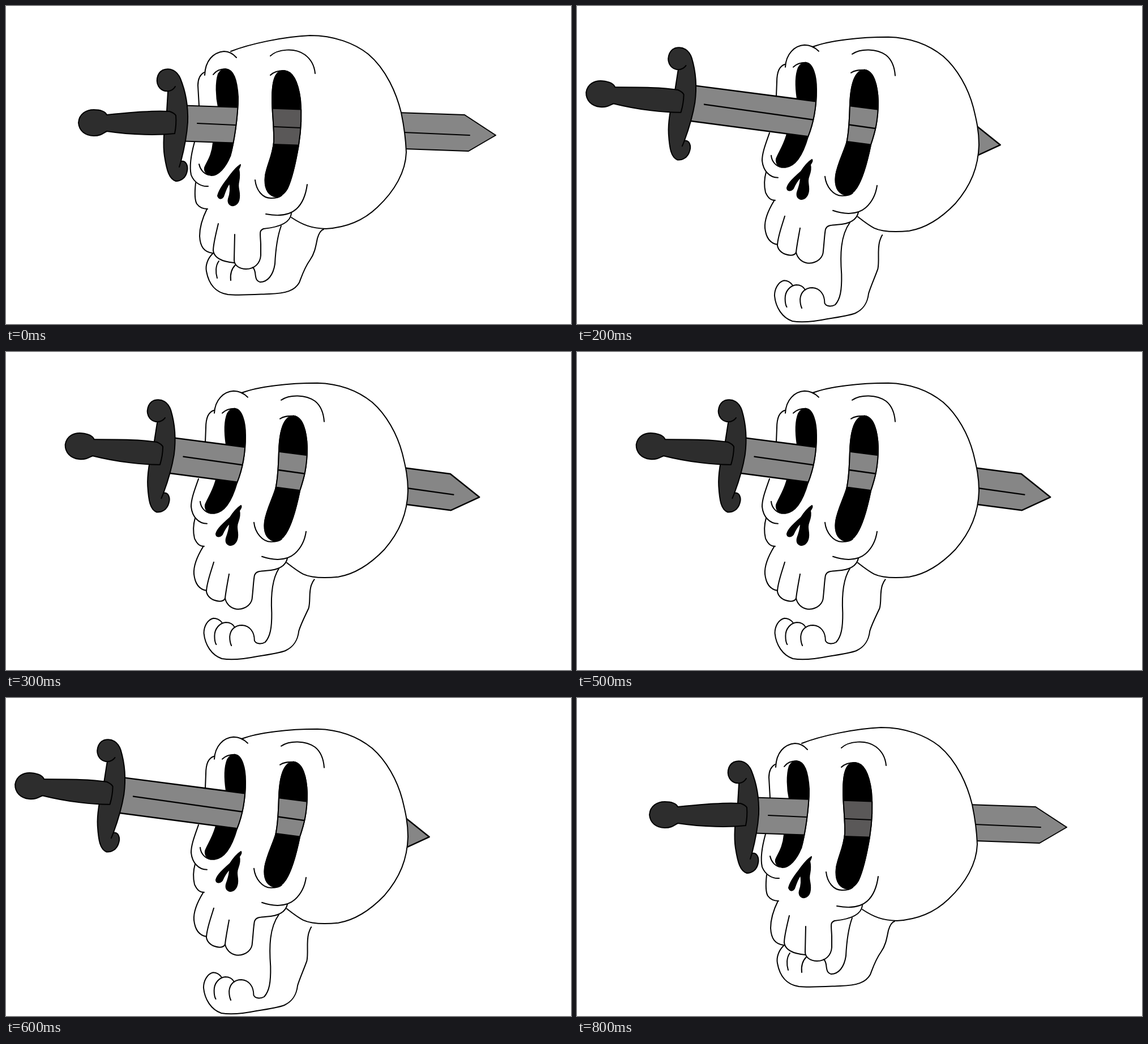
Animation, 998 px wide and 561 px high, one loop 900 ms. Source, as an HTML page with a canvas:

```html
<!DOCTYPE html>
<html lang="en">
<head>
<meta charset="utf-8">
<title>Skull and sword</title>
<style>
html, body { margin: 0; width: 100%; height: 100%; overflow: hidden; background: #fff; }
canvas { display: block; width: 100vw; height: 100vh; }
</style>
</head>
<body>
<canvas id="stage" width="998" height="561"></canvas>
<script>
const ctx = document.getElementById('stage').getContext('2d');
const STEP = 100;

const closed = {
  cranium: 'M397 80C430 67 490 54 537 52C580 52 616 66 640 85C672 112 690 155 698 188C703 212 706 232 707 258C706 292 687 326 656 355C631 379 600 391 565 393C540 392 525 387 504 373',
  lines: [
    // brows and lids
    'M407 91C400 83 393 80 385 80C366 82 352 96 351 122',
    'M350 117C341 122 339 132 339 140L341 176',
    'M467 88C480 76 510 73 528 86C540 95 545 108 546 119',
    'M467 122C473 116 480 114 491 114M366 121C371 114 378 111 388 111',
    // cheeks
    'M333 240C328 258 323 280 327 298C332 311 344 319 357 318',
    'M341 279C343 288 349 296 358 298',
    'M335 312C333 330 333 342 337 349C342 356 348 358 356 358',
    'M440 307C442 325 453 339 468 339C478 339 484 337 487 334',
    'M459 367C480 371 500 370 513 358C525 347 530 330 532 315',
    // upper teeth
    'M355 358C347 374 342 390 342 406C343 425 350 434 365 436',
    'M375 384C370 405 366 420 366 432C368 443 380 451 403 453',
    'M404 403L403 448C403 458 413 464 424 464C440 464 449 453 450 440L450 420C449 400 447 396 455 393C475 391 502 385 504 366'
  ],
  jaw: [
    'M486 388C478 410 476 435 475 455C472 475 462 487 449 487C441 485 441 478 440 470C439 465 438 463 436 461',
    'M366 436C356 445 352 458 354 468C358 490 370 506 392 509C410 511 440 509 465 508C495 507 510 502 518 488C523 475 527 462 537 448C545 437 547 425 550 410C553 400 557 395 561 394',
    'M376 450C370 458 370 470 373 480M405 457C397 465 396 475 397 484'
  ],
  nose: 'M414 280C404 286 399 295 392 304C384 314 376 325 374 335C376 341 381 341 384 336C387 327 390 318 395 312C397 322 396 332 393 340C391 348 396 353 402 352C410 350 413 342 412 330C411 322 409 318 411 310C413 300 412 292 411 288C412 285 414 283 414 280',
  rim: { x: 410, y: 160, curve: 'C410 195 403 240 396 265' },
  leftEye: ['M388 111C402 112 408 130 410 160', 'C388 285 375 299 363 299C354 298 350 292 351 285C355 275 364 265 366 241L375 178C371 160 370 135 375 120C379 113 383 111 388 111Z'],
  rightEye: 'M491 114C507 115 516 135 520 165C523 195 521 220 517 245C511 280 505 305 497 322C490 334 482 337 474 336C462 332 456 320 458 300C461 280 471 265 473 240C474 215 470 190 470 165C470 135 474 114 491 114Z',
  inner: '#5a5858',
  bladeLine: 2
};

const open = {
  cranium: 'M417 73C445 62 500 56 550 56C590 57 622 70 647 90C672 112 691 146 700 180C706 204 710 222 710 246C709 285 696 318 668 350C642 377 616 393 587 398C565 400 540 400 525 393C515 388 505 380 496 373',
  lines: [
    'M427 81C419 73 411 70 402 70C384 71 369 86 368 109',
    'M368 104C356 107 353 122 353 135L352 160',
    'M486 86C501 76 529 76 546 88C557 97 561 110 562 124',
    'M484 119C490 115 496 114 508 114M382 109C387 104 395 101 404 101',
    'M340 225C333 245 327 260 327 274C329 292 340 304 355 304',
    'M343 265C344 275 351 284 362 286',
    'M334 294C331 305 330 318 333 330C338 341 343 344 350 344',
    'M438 302C440 320 453 336 468 336C477 336 484 334 487 331',
    'M452 362C472 369 495 370 510 357C522 346 528 332 530 318',
    'M348 345C337 363 331 380 332 393C334 411 342 420 354 422',
    'M367 372C361 392 354 410 354 424C356 434 365 440 377 441C383 441 386 438 387 436',
    'M394 393C391 410 388 425 387 436C390 449 401 455 410 455C425 454 435 445 435 433C437 415 437 405 439 395C442 387 450 388 460 387C478 386 494 380 497 365'
  ],
  jaw: [
    'M482 382C472 400 470 425 471 450C471 475 468 490 459 500C452 504 442 503 440 497C440 482 432 471 418 470C405 470 397 478 396 490C396 497 397 502 399 506',
    'M405 474C402 468 396 465 389 465C378 466 369 476 369 489C369 496 370 501 372 504',
    'M382 465C378 460 373 458 367 458C356 460 350 473 350 484C352 505 364 523 382 529C400 532 425 529 445 525C465 522 485 519 495 515C510 508 517 497 519 480C523 467 530 455 537 443C541 432 538 420 543 408C545 404 547 401 549 399'
  ],
  nose: 'M415 272C406 278 401 285 396 293C386 302 373 313 371 322C371 328 378 328 382 323C386 314 390 308 395 303C395 315 392 320 389 330C387 338 392 343 398 342C407 340 410 330 409 320C408 312 407 308 410 300C413 292 413 285 412 281C414 278 417 275 415 272',
  rim: { x: 423, y: 148, curve: 'C423 180 417 210 408 232' },
  leftEye: ['M404 101C417 102 423 125 423 148', 'C400 260 388 284 368 286C356 286 351 280 352 271C356 260 364 250 370 230L389 165C386 145 385 125 391 110C395 103 400 101 404 101Z'],
  rightEye: 'M508 114C524 116 531 140 532 170C532 205 526 225 519 246C512 280 505 305 494 322C487 333 480 335 472 334C460 330 455 318 457 300C460 280 471 260 476 243C481 222 481 200 482 175C483 150 487 115 508 114Z',
  inner: '#868686',
  bladeLine: 2.5
};

const sword = {
  blade: new Path2D('M300 175L810 192L865 228L817 256L300 238Z'),
  groove: new Path2D('M338 207L819 228'),
  guard: new Path2D('M299 142C293 152 280 153 272 145C263 135 266 119 277 113C290 108 302 114 308 128C317 150 322 175 321 205C319 235 314 255 309 274C318 272 322 282 320 291C318 303 309 309 300 309C288 305 284 290 280 265C276 240 280 210 284 185L286 151'),
  curl: new Path2D('M309 274L306 284'),
  grip: new Path2D('M300 193C301 205 300 215 298 225C270 228 225 228 178 221C172 224 168 229 155 229C140 229 129 220 128 206C129 190 142 183 155 183C168 183 175 186 178 192C220 188 260 184 289 186C295 188 298 190 300 193Z')
};

// drop: jaw stretch, lift: skull rise, x/y/turn: sword placement
const rest = { art: closed, drop: 0, lift: 0, x: 0, y: 0, turn: 0 };
const opened = (drop, lift, dx, dy) =>
  ({ art: open, drop, lift, x: -63 + dx, y: -30 + dy, turn: 5.5 * Math.PI / 180 });
const half = opened(0, 0, 0, 0);
const thrust = opened(12, -1.2, 38.5, 3);
const pull = opened(27, -1.2, -50, -8);
const poses = [rest, half, pull, thrust, pull, thrust, pull, half, rest];

const clamp = v => Math.min(1, Math.max(0, v));

// The jaw lowers below its hinge and swings back most near the hinge
function stretch(path, drop) {
  return path.replace(/(\d+) (\d+)/g, (_, x, y) => {
    const k = clamp((y - 385) / 75);
    const swing = (0.1 + (x - 350) / 650) * clamp((y - 382) / 15) * (1 - 0.6 * k);
    return `${x - drop * swing} ${+y + drop * k}`;
  });
}

function line(path) {
  ctx.stroke(path instanceof Path2D ? path : new Path2D(path));
}

function shape(path, color) {
  const p = path instanceof Path2D ? path : new Path2D(path);
  ctx.fillStyle = color;
  ctx.fill(p);
  ctx.stroke(p);
}

function drawSword(pose, clip, metal, lift) {
  ctx.save();
  ctx.translate(0, lift);
  ctx.clip(new Path2D(clip));
  ctx.translate(290 + pose.x, 210 + pose.y - lift);
  ctx.rotate(pose.turn);
  ctx.translate(-290, -210);
  ctx.lineWidth = pose.art.bladeLine;
  shape(sword.blade, metal);
  line(sword.groove);
  ctx.lineWidth = 2;
  shape(sword.guard, '#2d2d2d');
  line(sword.curl);
  shape(sword.grip, '#2d2d2d');
  ctx.restore();
}

function draw(pose) {
  const { art, lift } = pose;
  const { x, y, curve } = art.rim;
  ctx.fillStyle = '#fff';
  ctx.fillRect(0, 0, 998, 561);
  ctx.strokeStyle = '#000';
  ctx.lineWidth = 2;
  ctx.lineCap = ctx.lineJoin = 'round';

  art.jaw.forEach(p => line(stretch(p, pose.drop)));
  drawSword(pose, 'M640 0H998V561H640Z', '#868686', 0);

  ctx.save();
  ctx.translate(0, lift);
  shape(art.cranium, '#fff');
  art.lines.forEach(line);
  shape(art.nose, '#000');
  shape(art.leftEye.join(curve), '#000');
  shape(art.rightEye, '#000');
  ctx.restore();

  drawSword(pose, `M-9 -9H${x}V${y}${curve}L340 570H-9Z`, '#868686', lift);
  drawSword(pose, art.rightEye, art.inner, lift);

  ctx.save();
  ctx.translate(0, lift);
  line(`M${x} ${y}${curve}`);
  line(art.rightEye);
  ctx.restore();
}

function tick(now) {
  draw(poses[Math.floor(now / STEP) % poses.length]);
  requestAnimationFrame(tick);
}
draw(rest);
requestAnimationFrame(tick);
</script>
</body>
</html>
```
